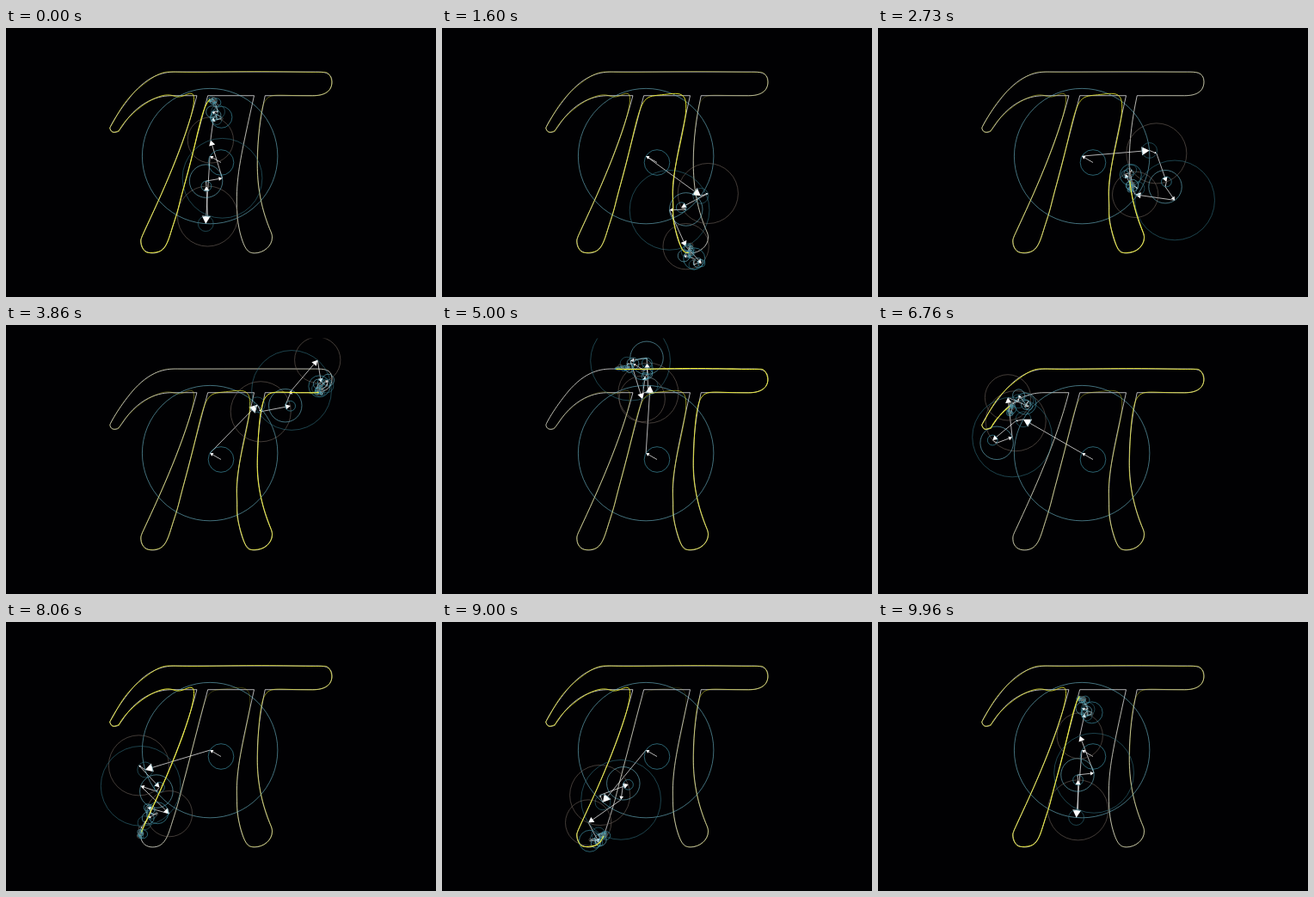
An HTML page with a canvas that plays this animation: 500 by 313 pixels, repeating every 10000 ms.

```html
<!DOCTYPE html>
<html lang="en">
<head>
<meta charset="utf-8">
<title>Fourier series drawing of pi</title>
<style>
html, body { margin: 0; width: 100%; height: 100%; overflow: hidden; background: #010103; }
canvas { display: block; }
</style>
</head>
<body>
<canvas id="stage" width="500" height="313"></canvas>
<script>
const ctx = document.getElementById('stage').getContext('2d');
const TAU = 2 * Math.PI, FPS = 30, STEPS = 300;
const CENTER = [250, 156.5], SCALE = 0.748, GLYPH_MID = [189.5, -134];
const MAX_FREQ = 25, TRACE_STEPS = 480, TRACE_WIDTH = 1.05;
const THIN = 0.7, CIRCLE_WIDTH = 0.6;
const BACKGROUND = '#010103', TRACE_COLOR = '#f4f430';
const CIRCLE_COLORS = ['#45a0b6', '#6fbbcd', '#2f6e7d', '#6f645c'];

const GLYPH = 'M169 -238 H241 C220 -144 214 -116 214 -73 C214 -64 214 -47 219 -25 ' +
  'C226 3 233 7 242 7 C255 7 269 -4 269 -17 C269 -21 269 -22 265 -31 ' +
  'C246 -77 246 -119 246 -137 C246 -170 251 -205 258 -238 H330 ' +
  'C339 -238 362 -238 362 -260 C362 -275 348 -275 336 -275 H122 ' +
  'C108 -275 84 -275 56 -245 C34 -220 17 -191 17 -188 C17 -187 17 -181 25 -181 ' +
  'C30 -181 31 -184 35 -189 C66 -238 103 -238 116 -238 H152 ' +
  'C132 -161 97 -84 70 -26 C65 -16 65 -15 65 -10 C65 2 75 7 83 7 ' +
  'C102 7 107 -10 114 -33 C123 -61 123 -62 131 -93 Z';

const mix = (a, b, u) => [a[0] + (b[0] - a[0]) * u, a[1] + (b[1] - a[1]) * u];

// Turn the glyph into cubic segments; lines become evenly spaced cubics.
function parseGlyph(text) {
  const segments = [];
  let pen, start;
  for (const [, cmd, args] of text.matchAll(/([MHCZ])([^MHCZ]*)/g)) {
    const n = args.trim().split(' ').map(Number);
    if (cmd === 'M') { pen = start = n; continue; }
    let rest;
    if (cmd === 'C') {
      rest = [[n[0], n[1]], [n[2], n[3]], [n[4], n[5]]];
    } else {
      const end = cmd === 'H' ? [n[0], pen[1]] : start;
      rest = [mix(pen, end, 1 / 3), mix(pen, end, 2 / 3), end];
    }
    segments.push([pen, ...rest]);
    pen = rest[2];
  }
  return segments;
}

function bezier(points, u) {
  while (points.length > 1) points = points.slice(1).map((p, i) => mix(points[i], p, u));
  return points[0];
}

// Every segment takes an equal share of the cycle.
function samplePath(segments, perSegment) {
  return segments.flatMap(s => Array.from({ length: perSegment }, (_, i) => {
    const [x, y] = bezier(s, i / perSegment);
    return [(x - GLYPH_MID[0]) * SCALE, (y - GLYPH_MID[1]) * SCALE];
  }));
}

function coefficient(samples, freq) {
  let re = 0, im = 0;
  samples.forEach(([x, y], i) => {
    const a = TAU * freq * i / samples.length, c = Math.cos(a), s = Math.sin(a);
    re += x * c + y * s;
    im += y * c - x * s;
  });
  return { freq, radius: Math.hypot(re, im) / samples.length, phase: Math.atan2(im, re) };
}

const samples = samplePath(parseGlyph(GLYPH), 100);
const terms = [coefficient(samples, 0)];
for (let k = 1; k <= MAX_FREQ; k++) {
  terms.push(coefficient(samples, -k), coefficient(samples, k));
}

// Joints of the vector chain at cycle position t.
function chain(t) {
  const joints = [CENTER];
  for (const { freq, radius, phase } of terms) {
    const a = phase + TAU * freq * t, [x, y] = joints[joints.length - 1];
    joints.push([x + radius * Math.cos(a), y + radius * Math.sin(a)]);
  }
  return joints;
}

const trace = Array.from({ length: TRACE_STEPS + 1 }, (_, i) => chain(i / TRACE_STEPS).pop());
const outline = new Path2D(GLYPH);

function line(a, b, color, width) {
  ctx.strokeStyle = color;
  ctx.lineWidth = width;
  ctx.beginPath();
  ctx.moveTo(...a);
  ctx.lineTo(...b);
  ctx.stroke();
}

function drawOutline() {
  ctx.save();
  ctx.translate(...CENTER);
  ctx.scale(SCALE, SCALE);
  ctx.translate(-GLYPH_MID[0], -GLYPH_MID[1]);
  ctx.strokeStyle = '#fff';
  ctx.lineWidth = THIN / SCALE;
  ctx.stroke(outline);
  ctx.restore();
}

function drawArrow(from, to, length) {
  const tip = Math.min(length / 4, 2.6 + 0.08 * length);
  const base = mix(to, from, tip / length);
  const dx = (to[0] - base[0]) * 0.57, dy = (to[1] - base[1]) * 0.57;
  line(from, base, '#fff', Math.min(THIN, length / 6));
  ctx.fillStyle = '#fff';
  ctx.beginPath();
  ctx.moveTo(...to);
  ctx.lineTo(base[0] - dy, base[1] + dx);
  ctx.lineTo(base[0] + dy, base[1] - dx);
  ctx.fill();
}

function drawCircle([x, y], radius, color) {
  ctx.strokeStyle = color;
  ctx.lineWidth = CIRCLE_WIDTH;
  ctx.beginPath();
  ctx.arc(x, y, radius, 0, TAU);
  ctx.stroke();
}

// The trace thins out with age over one full cycle.
function drawTrace(t) {
  for (let i = 0; i < TRACE_STEPS; i++) {
    const from = i / TRACE_STEPS, to = (i + 1) / TRACE_STEPS;
    const live = t >= from && t < to;
    const end = live ? mix(trace[i], trace[i + 1], (t - from) * TRACE_STEPS) : trace[i + 1];
    const age = (t - from + 1) % 1;
    line(trace[i], end, TRACE_COLOR, Math.max(0.01, TRACE_WIDTH * (1 - age)));
  }
}

// The picture advances in whole steps, each posed at its middle.
function draw(now) {
  const step = Math.floor(now * FPS / 1000 + 0.25) % STEPS;
  const t = (step + 0.5) / STEPS;
  const joints = chain(t);
  ctx.fillStyle = BACKGROUND;
  ctx.fillRect(0, 0, 500, 313);
  ctx.save();
  ctx.beginPath();
  ctx.rect(0, 15.5, 500, 281.5);
  ctx.clip();
  drawOutline();
  terms.forEach(({ radius }, i) => drawArrow(joints[i], joints[i + 1], radius));
  terms.forEach(({ radius }, i) => drawCircle(joints[i], radius, CIRCLE_COLORS[i % 4]));
  drawTrace(t);
  ctx.restore();
}

const began = performance.now();
function tick() {
  draw(performance.now() - began);
  requestAnimationFrame(tick);
}
tick();
</script>
</body>
</html>
```
